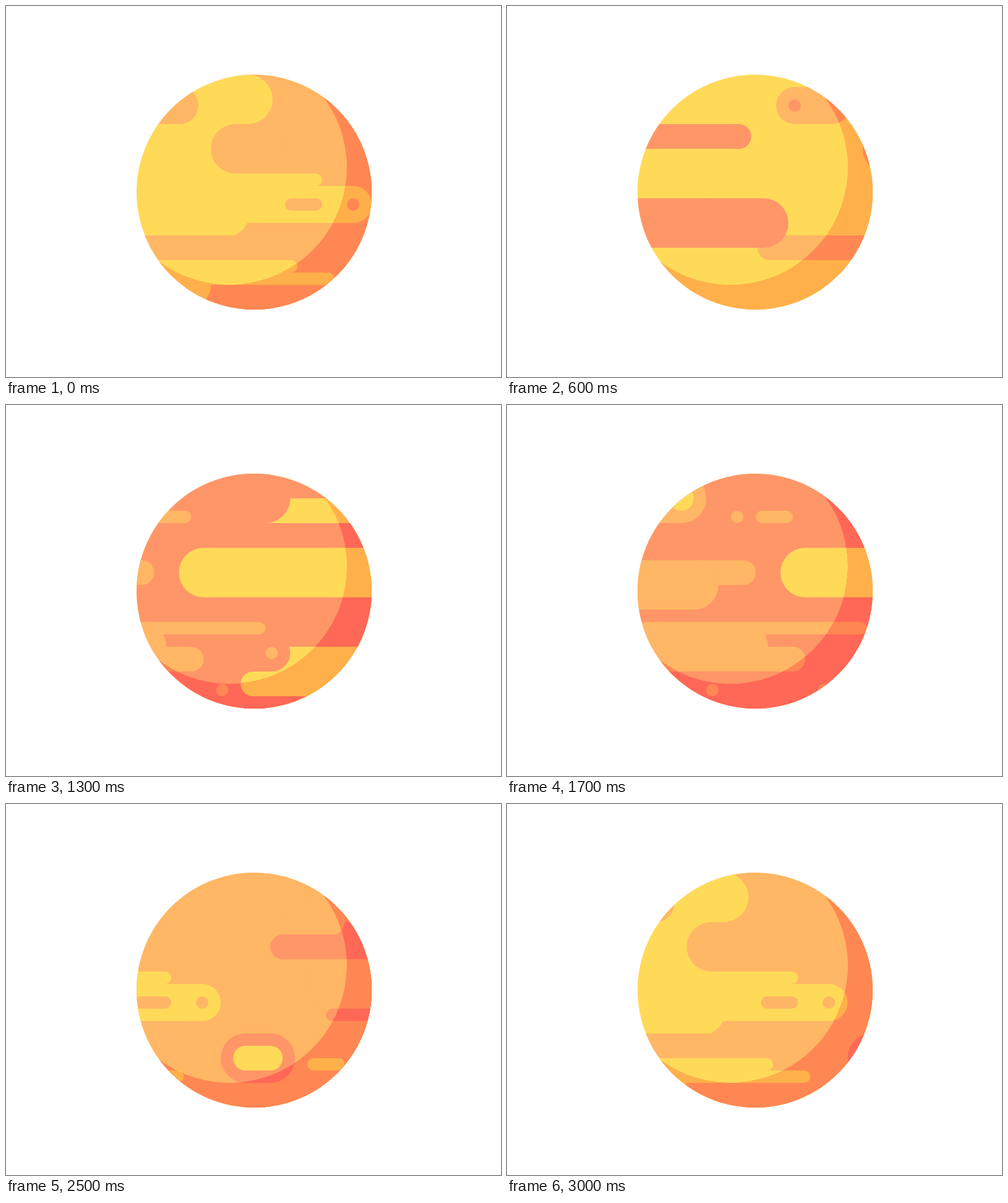
An HTML page that plays this animation: 800x600 px, repeating every 3.1 s.

```html
<!DOCTYPE html>
<html lang="en">
<head>
<meta charset="utf-8">
<title>Spinning planet</title>
<style>
  html, body { margin: 0; width: 100%; height: 100%; overflow: hidden; background: #fff; }
  svg { display: block; }
</style>
</head>
<body>
<svg id="stage" width="800" height="600" viewBox="0 0 800 600">
  <defs>
    <clipPath id="ball"><circle cx="401" cy="301" r="190"/></clipPath>
    <clipPath id="shade">
      <path d="M513.85 148.15A190 190 0 1 1 248.15 413.85A190 190 0 0 0 513.85 148.15Z"/>
    </clipPath>
  </defs>
</svg>
<script>
const LOOP = 3100, STEP = 100, CELL = 20, COLS = 63;
const WIDTH = CELL * COLS;
const LIT = { y: '#ffda59', o: '#ffb665', p: '#ff9668' };
const DARK = { y: '#ffb04a', o: '#ff8753', p: '#ff6757' };

// Surface map in cells of 20px: yellow base with orange and pink bands.
function surface(pal) {
  let out = '';
  const box = (c, x0, x1, y0, y1, r = 0) => {
    out += `<rect x="${x0}" y="${y0}" width="${x1 - x0}" height="${y1 - y0}" rx="${r}" fill="${pal[c]}"/>`;
  };
  const pill = (c, x0, x1, y0, y1) => box(c, x0, x1, y0, y1, (y1 - y0) / 2);
  const dot = (c, x, y, r) => pill(c, x - r, x + r, y - r, y + r);

  // yellow to orange
  box('o', 18, 42, 0, 19);
  box('o', 14, 19, 17, 19);
  pill('o', 16, 22, 4, 8);
  pill('o', 7.5, 22, 13, 15);
  pill('y', 16, 21, 0, 4);
  pill('y', 16, 25, 8, 9);
  pill('y', 14, 29, 9, 12);
  pill('y', 14, 19, 10, 13);
  pill('y', 10, 23, 15, 16);
  pill('y', 10, 26, 16, 17);
  pill('y', 10, 16, 15, 19);
  pill('o', 22, 25, 10, 11);
  dot('o', 27.5, 10.5, .5);
  pill('o', 9, 15, 1, 4);
  dot('p', 10.5, 2.5, .5);

  // spots on orange
  pill('p', 29, 35, 13, 17);
  pill('y', 30, 34, 14, 16);

  // pink region and its ends in yellow
  box('p', 41, 57, 0, 19);
  box('p', 38, 42, 4, 5);
  box('p', 38, 42, 16, 19);
  pill('p', 33, 46, 5, 7);
  pill('p', 37.5, 46, 11, 12);
  pill('p', 50, 59, 0, 4);
  pill('p', 50, 64, 0, 2);
  pill('p', 50, 70, 4, 6);
  pill('p', 50, 73, 10, 14);
  pill('p', 50, 59, 13, 16);
  pill('p', 50, 62, 18, 19);
  pill('y', 50, 68, 6, 10);
  pill('y', 55, 63, 16, 18);

  // orange reaching into pink
  pill('o', 36, 44, 0, 4);
  pill('o', 34, 39, 3, 5);
  pill('o', 36, 48, 7, 9);
  pill('o', 36, 45, 7, 11);
  pill('o', 38, 57, 12, 13);
  pill('o', 38, 49, 12, 16);
  pill('o', 40, 52, 14, 16);
  pill('o', 35, 41, 13, 19);

  // small marks
  pill('y', 36, 39, 15, 16);
  dot('y', 42, 2, 1);
  dot('o', 46.5, 3.5, .5);
  pill('o', 48, 51, 3, 4);
  dot('o', 44.5, 17.5, .5);
  dot('o', 53.5, 17.5, .5);
  dot('o', 57.5, 14.5, .5);
  return out;
}

// The right-hand copy lies below, so the last pink band overlaps the next turn.
function layer(pal, clip) {
  const map = surface(pal);
  return `<g clip-path="url(#${clip})">
    <rect x="205" y="105" width="392" height="392" fill="${pal.y}"/>
    <g class="map"><g transform="translate(${COLS} 0)">${map}</g><g>${map}</g></g></g>`;
}

const stage = document.getElementById('stage');
stage.insertAdjacentHTML('beforeend', layer(LIT, 'ball') + layer(DARK, 'shade'));
const maps = stage.querySelectorAll('.map');

function draw(ms) {
  const step = Math.floor((ms % LOOP) / STEP);
  const x = 11 - WIDTH + WIDTH * step * STEP / LOOP;
  for (const m of maps) m.setAttribute('transform', `translate(${x.toFixed(3)} 111) scale(${CELL})`);
}

function tick() {
  draw(performance.now());
  requestAnimationFrame(tick);
}
draw(0);
requestAnimationFrame(tick);
</script>
</body>
</html>
```
